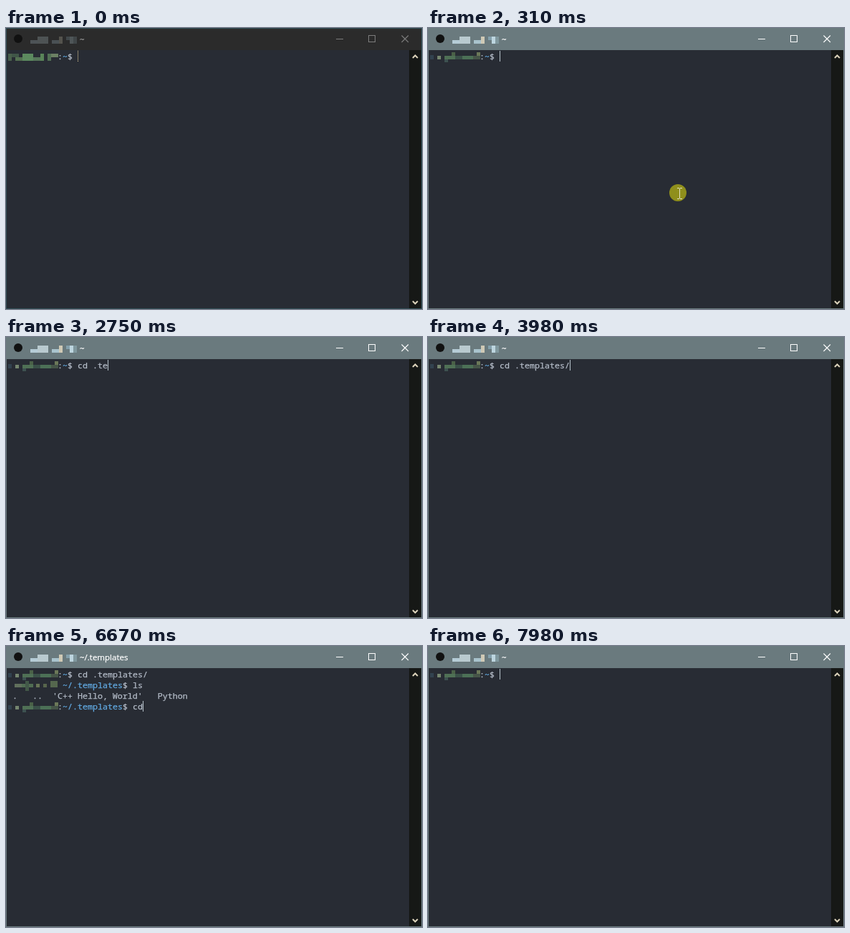
Animation of 581 by 394 pixels, one loop 8 s. Source, as an HTML page with a canvas:

```html
<!DOCTYPE html>
<html lang="en">
<head>
<meta charset="utf-8">
<title>Terminal</title>
<style>
html, body { margin: 0; width: 100%; height: 100%; overflow: hidden; background: #282c34; }
canvas { display: block; }
</style>
</head>
<body>
<canvas id="stage" width="581" height="394"></canvas>
<script>
const ctx = document.getElementById('stage').getContext('2d');
const LOOP = 8000, CELL = 7, LINE = 15;
const ENTER = 140, CLICK = 280, RELEASE = 380, TYPE = 1530, CLEAR = 7980;
const MONO = '11.667px "Noto Sans Mono", monospace';
const SANS = '11.5px "Open Sans", sans-serif';
const INK = '#b4bcc8', BLUE = '#62abe4';
const DIR = '~/.templates';
const paths = ['~', DIR, '', DIR, '~'];

// [time, row, typed text]; null means a command is running
const steps = [
  [0, 0, ''], [TYPE, 0, 'c'], [1640, 0, 'cd'], [1750, 0, 'cd '],
  [2490, 0, 'cd .'], [2670, 0, 'cd .t'], [2750, 0, 'cd .te'],
  [3050, 0, 'cd .tem'], [3200, 0, 'cd .temp'], [3950, 0, 'cd .templates/'],
  [4520, 1, null], [4570, 1, ''], [5390, 1, 'l'], [5490, 1, 'ls'],
  [5590, 2, null], [5710, 3, ''], [6620, 3, 'c'], [6670, 3, 'cd'],
  [7210, 4, null], [7290, 4, ''], [7640, 4, 'c'], [7720, 4, 'cl'], [7790, 4, 'cls'],
  [7960, 5, null], [CLEAR, 0, '']
];
const cursorOff = [[830, 1350], [2270, 2490], [3700, 3950], [5140, 5390], [6200, 6620]];
const within = (t, a, b) => t >= a && t < b;

// Blurred names: x, y, width, height, colour
const homeBlur = [
  [3, 6, 5, 6, '#32424f'], [13, 7, 5, 5, '#75866f'], [23, 7, 15, 5, '#4f7055'],
  [33, 2, 5, 5, '#4a6148'], [23, 12, 5, 4, '#3d5250'], [38, 7, 10, 5, '#3a5048'],
  [48, 7, 15, 5, '#4c7056'], [63, 7, 10, 5, '#465548'], [68, 2, 5, 5, '#6b7858']
];
const dirBlur = [
  [12, 6, 10, 5, '#61705c'], [22, 6, 16, 5, '#506c52'], [27, 2, 5, 14, '#425848'],
  [42, 6, 5, 5, '#677455'], [52, 6, 5, 5, '#57654c'], [62, 2, 10, 9, '#55674e']
];
const idleBlur = [
  [3, 4, 5, 10, '#49604c'], [8, 4, 10, 5, '#405648'], [13, 9, 10, 5, '#547052'],
  [23, 4, 15, 10, '#5c8a5f'], [38, 9, 10, 5, '#56765a'], [48, 4, 5, 10, '#598459'],
  [58, 4, 5, 10, '#527055'], [63, 4, 10, 5, '#6b8064']
];
const titleBlur = [
  [34, 17, 10, 5, '#b5ccd6'], [44, 12, 15, 10, '#b9cacf'], [64, 17, 10, 5, '#a9c3cd'],
  [74, 12, 5, 10, '#cfc9b5'], [84, 12, 5, 5, '#84a0ac'], [89, 12, 5, 10, '#bdd5df'],
  [94, 12, 5, 10, '#7f979e']
];

function rect(x, y, w, h, color) {
  ctx.fillStyle = color;
  ctx.fillRect(x, y, w, h);
}

function line(color, width, ...pts) {
  ctx.strokeStyle = color;
  ctx.lineWidth = width;
  ctx.beginPath();
  for (const [x, y] of pts) ctx.lineTo(x, y);
  ctx.stroke();
}

function disc(x, y, r, color) {
  ctx.fillStyle = color;
  ctx.beginPath();
  ctx.arc(x, y, r, 0, 7);
  ctx.fill();
}

// A thin outline gives the strokes their medium weight
function text(str, x, y, color, font = MONO) {
  ctx.font = font;
  ctx.fillStyle = ctx.strokeStyle = color;
  ctx.lineWidth = 0.25;
  ctx.fillText(str, x, y);
  ctx.strokeText(str, x, y);
}

const cell = (str, col, row, color) => text(str, 2 + col * CELL, 44 + row * LINE, color);

function blur(tiles, dy = 0) {
  for (const [x, y, w, h, color] of tiles) rect(x, y + dy, w, h, color);
}

function drawWindow(t) {
  const active = t >= CLICK;
  const bar = active ? '#6a7a7e' : '#2b2b2b';
  const ink = active ? '#fff' : '#7d7d7d';
  rect(0, 0, 581, 394, active ? bar : '#304e56');
  rect(1, 1, 579, 30, bar);
  rect(1, 31, 562, 362, '#282c34');
  rect(563, 31, 17, 362, '#161816');

  disc(17, 15, 6, '#111');
  ctx.globalAlpha = active ? 1 : 0.25;
  blur(titleBlur);
  ctx.globalAlpha = 1;
  text(within(t, 4570, 7290) ? DIR : '~', 103, 20, active ? ink : '#999', SANS);

  line(ink, 1, [461, 15.5], [471, 15.5]);
  ctx.strokeRect(506.5, 10.5, 9, 9);
  line(ink, 1.1, [552.5, 10.5], [562, 20]);
  line(ink, 1.1, [562, 10.5], [552.5, 20]);

  const arrow = '#dcd3bb';
  line(arrow, 2, [568, 42], [571.5, 38.5], [575, 42]);
  line(arrow, 2, [568, 383], [571.5, 386.5], [575, 383]);
}

function drawPrompt(row, typed, t) {
  const path = paths[row], end = 11 + path.length;
  const tiles = row === 1 ? dirBlur : t < CLICK ? idleBlur : homeBlur;
  blur(tiles, 32 + row * LINE);
  if (row !== 1) cell(':', 10, row, INK);
  cell(path, 11, row, BLUE);
  cell('$', end, row, INK);
  cell(typed, end + 2, row, INK);
  return end + 2 + typed.length;
}

function drawShell(t) {
  let typed = [], now;
  for (const step of steps) {
    const [time, row, str] = step;
    if (time > t) break;
    now = step;
    if (time === CLEAR) typed = [];
    if (str !== null) typed[row] = str;
  }
  let col = 0;
  typed.forEach((str, row) => {
    const end = drawPrompt(row, str, t);
    if (row === now[1]) col = end;
  });
  if (within(t, 5710, CLEAR)) cell(" .   ..  'C++ Hello, World'   Python", 0, 2, INK);

  const x = 2 + col * CELL, y = 32 + now[1] * LINE;
  if (t < CLICK) {
    for (let i = 0; i < LINE; i += 2) rect(x, y + i, 1, 1, '#e6cf9a');
  } else if (!cursorOff.some(([a, b]) => within(t, a, b))) {
    rect(x, y, 1, LINE, '#b8c4cc');
  }
}

// The pointer glides in from the right, clicks, and hides on typing
function drawPointer(t) {
  if (!within(t, ENTER, TYPE)) return;
  const left = Math.max(0, 1 - (t - ENTER) / (CLICK - ENTER)) ** 2;
  const x = Math.round(351 + 225 * left), y = Math.round(232 + 40 * left);
  if (within(t, CLICK, RELEASE)) disc(x - 2, y - 1, 12, '#8f8f1c');
  const color = '#e4e2c4';
  rect(x, y - 7, 1, 14, color);
  for (const end of [y - 8, y + 7]) {
    rect(x - 3, end, 3, 1, color);
    rect(x + 1, end, 3, 1, color);
  }
}

function frame(now) {
  const t = now % LOOP;
  drawWindow(t);
  drawShell(t);
  drawPointer(t);
  requestAnimationFrame(frame);
}
requestAnimationFrame(frame);
</script>
</body>
</html>
```
